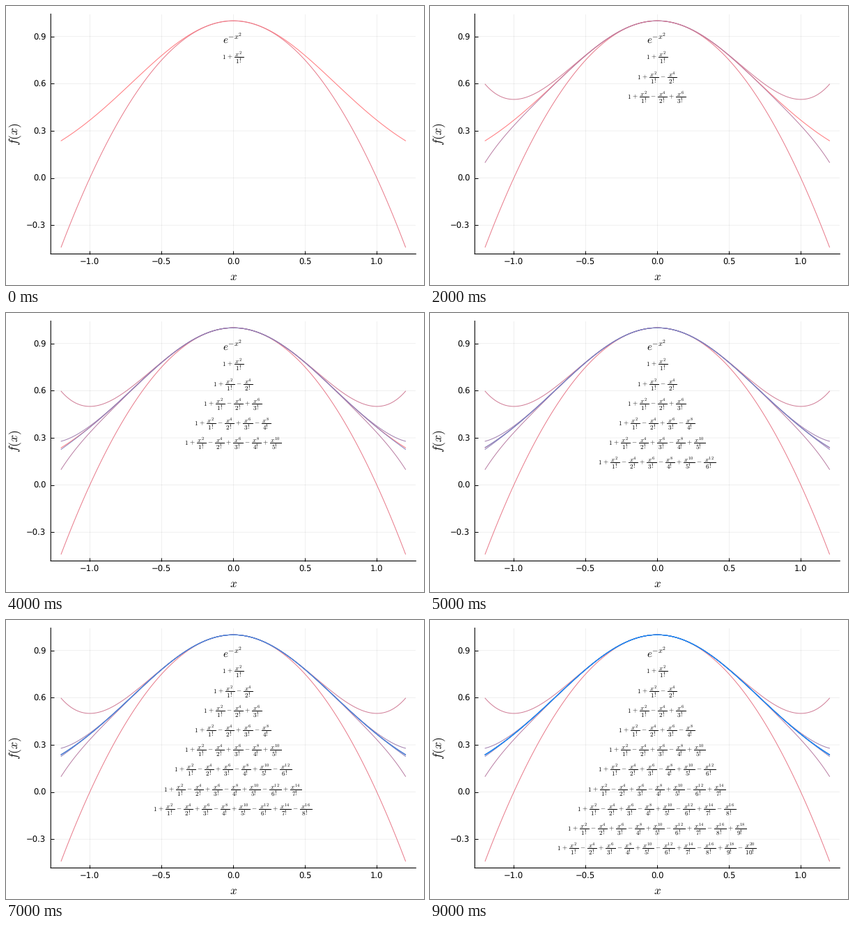
Animation, 600 px wide and 400 px high, one loop 10 s. Source, as a matplotlib script:

```python
import math

import numpy as np
import matplotlib as mpl
import matplotlib.pyplot as plt
from matplotlib.animation import FuncAnimation

W, H, DPI = 600, 400, 100
LEFT, BOTTOM, AX_W, AX_H = 64.3, 355.5, 524, 344
ORDERS = 10
RED = np.array([255, 120, 125]) / 255
BLUE = np.array([20, 138, 250]) / 255

mpl.rcParams["font.family"] = "DejaVu Sans"
mpl.rcParams["mathtext.fontset"] = "cm"
mpl.rcParams["text.hinting"] = "none"
mpl.rcParams["path.simplify"] = False
mpl.rcParams["path.snap"] = False


def pt(px):
    return px * 72 / DPI


def mix(k):
    return RED + (BLUE - RED) * k / ORDERS


def series(x, n):
    return sum((-1) ** k * x ** (2 * k) / math.factorial(k) for k in range(n + 1))


def formula(n):
    text = "1"
    for k in range(1, n + 1):
        sign = "+" if k % 2 else "-"
        text += rf"\, {sign} \,\dfrac{{\,x^{{{2 * k}}}\,}}{{{k}!}}"
    return f"${text}$"


fig = plt.figure(figsize=(W / DPI, H / DPI), dpi=DPI, facecolor="white")
ax = fig.add_axes([LEFT / W, 1 - BOTTOM / H, AX_W / W, AX_H / H])
ax.set_xlim(-1.272, 1.272)
ax.set_ylim(-0.4832, 1.0432)
ax.set_xticks(np.arange(-2, 3) / 2)
ax.set_yticks(np.arange(-1, 4) * 0.3)
ax.xaxis.set_major_formatter("{x:.1f}")
ax.yaxis.set_major_formatter("{x:.1f}")
ax.tick_params(direction="in", length=pt(5), width=pt(1), pad=pt(7),
               labelsize=pt(11.6))
ax.tick_params(axis="x", pad=pt(6.5))
ax.grid(color="black", alpha=0.1, lw=pt(0.6))
ax.set_axisbelow(True)
for side in ("top", "right"):
    ax.spines[side].set_visible(False)
for side in ("left", "bottom"):
    ax.spines[side].set_linewidth(pt(1.1))


def label(x, y, text, size, **kw):
    return fig.text(x / W, 1 - y / H, text, fontsize=pt(size),
                    ha="center", va="center", **kw)


label(326, 388, "$x$", 17)
label(13, 184, "$f(x)$", 17.8, rotation=90)
label(325.5, 46.5, "$e^{-x^2}$", 15)

x = np.linspace(-1.2, 1.2, 241)
ax.plot(x, np.exp(-x**2), color=RED, lw=pt(1))

steps = []
for n in range(1, ORDERS + 1):
    curve, = ax.plot(x, series(x, n), color=mix(n), lw=pt(1))
    steps.append((curve, label(325.5, 45.7 + 28.16 * n, formula(n), 9.1)))


def draw(frame):
    for i, parts in enumerate(steps):
        for part in parts:
            part.set_visible(i <= frame)
    return [part for parts in steps for part in parts]


anim = FuncAnimation(fig, draw, frames=ORDERS, interval=1000,
                     repeat=True, repeat_delay=0, blit=False)
plt.show()
```
